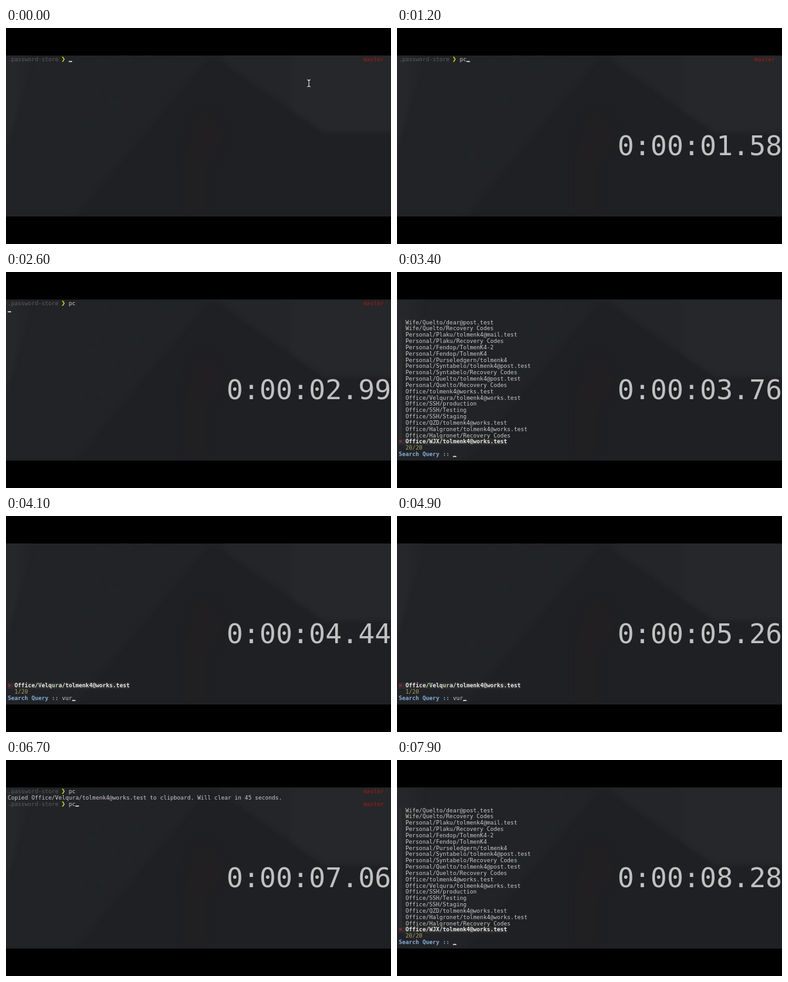
Write an HTML page that moves like this. It is 600 by 338 pixels and loops after 8000 ms.

```html
<!DOCTYPE html>
<html lang="en">
<head>
<meta charset="utf-8">
<title>Terminal search</title>
<style>
  html, body { margin: 0; width: 100%; height: 100%; overflow: hidden; background: #000; }
  svg { display: block; width: 100%; height: 100%; }
  text { font: 8.77px "DejaVu Sans Mono", monospace; white-space: pre; fill: #c9c9c9; }
  .path { fill: #5b5c5e; }
  .mark { fill: #d0dc20; font-size: 11px; font-weight: bold; }
  .branch { fill: #a51b14; }
  .bold { fill: #ececec; font-weight: bold; }
  .hit { fill: #b4d4b0; }
  .arrow { fill: #d3204c; font-weight: bold; }
  .count { fill: #a3a162; }
  .ask { fill: #86abd8; font-weight: bold; }
  .cursor { fill: #f0f0f0; }
  #timer { font-size: 42.6px; fill: #c1c1c1; }
</style>
</head>
<body>
<svg viewBox="0 0 600 338" preserveAspectRatio="none">
  <defs>
    <clipPath id="pane"><rect y="43" width="600" height="252"/></clipPath>
    <filter id="soft" x="-30%" y="-30%" width="160%" height="160%" color-interpolation-filters="sRGB"><feGaussianBlur stdDeviation="3"/></filter>
    <filter id="wide" x="-100%" y="-50%" width="300%" height="200%" color-interpolation-filters="sRGB"><feGaussianBlur stdDeviation="9"/></filter>
    <linearGradient id="edge">
      <stop offset="0" stop-color="#27292b"/>
      <stop offset="1" stop-color="#27292b" stop-opacity="0"/>
    </linearGradient>
  </defs>
  <rect width="600" height="338"/>
  <g clip-path="url(#pane)">
    <rect y="42" width="600" height="254" fill="#222326"/>
    <path d="M0 36H45L0 190Z" fill="url(#edge)" filter="url(#soft)"/>
    <path d="M325 30H610V166H495L345 60Z" fill="#242528" filter="url(#soft)"/>
    <path d="M443 30H610V165H495L443 130Z" fill="#26272a" filter="url(#soft)"/>
    <path d="M318 44L100 305H610V166H495L345 60Z" fill="#1f2023" filter="url(#soft)"/>
    <g id="weave" fill="#20282b" opacity=".5" filter="url(#soft)"></g>
    <path d="M282 300V200L295 140Q325 110 338 180L308 215V300Z" fill="#241f22" opacity=".45" filter="url(#wide)"/>
  </g>
  <g id="screen"></g>
  <g id="pointer" fill="none" stroke-linecap="round">
    <path id="beam" d="M469.8 81.2Q472 81.2 472 83V90Q472 91.8 469.8 91.8M474.2 81.2Q472 81.2 472 83M472 90Q472 91.8 474.2 91.8" stroke="#111" stroke-width="2.6"/>
    <path d="M469.8 81.2Q472 81.2 472 83V90Q472 91.8 469.8 91.8M474.2 81.2Q472 81.2 472 83M472 90Q472 91.8 474.2 91.8" stroke="#e8e8e8" stroke-width="1.2"/>
  </g>
  <text id="timer" x="343.8" y="199"></text>
</svg>
<script>
const LOOP = 8000, COL = 5.28, ROW = 9.84, LEFT = 2.7, BASE = 52;
const get = id => document.getElementById(id);
const screen = get('screen'), timer = get('timer'), pointer = get('pointer');

const user = 'tolmenk4', work = user + '@works.test', mail = user + '@post.test';
const codes = 'Recovery Codes';
const wanted = 'Office/Velqura/' + work;
const entries = [
  'Wife/Quelto/dear@post.test', 'Wife/Quelto/' + codes,
  'Personal/Plaku/' + user + '@mail.test', 'Personal/Plaku/' + codes,
  'Personal/Fendop/TolmenK4-2', 'Personal/Fendop/TolmenK4',
  'Personal/Purseledgern/' + user,
  'Personal/Syntabelo/' + mail, 'Personal/Syntabelo/' + codes,
  'Personal/Quelto/' + mail, 'Personal/Quelto/' + codes,
  'Office/' + work, wanted,
  'Office/SSH/production', 'Office/SSH/Testing', 'Office/SSH/Staging',
  'Office/QZD/' + work, 'Office/Halgronet/' + work, 'Office/Halgronet/' + codes,
  'Office/WJX/' + work
];

// Keystrokes and screen changes, in ms
const first = [['p', 800], ['c', 1000]];
const query = [['v', 3600], ['u', 3800], ['r', 4000]];
const second = [['p', 6400], ['c', 6600]];
const ENTER1 = 1700, LIST1 = 2800, PICK = 5000, COPIED = 6100, ENTER2 = 6800, LIST2 = 7700;
const ticks = [[0, .37], [1200, 1.58], [2600, 2.99], [4100, 4.44], [5700, 6.07], [6700, 7.06], [7900, 8.28]];

const typed = (keys, t) => keys.filter(k => t >= k[1]).map(k => k[0]).join('');
const px = col => (LEFT + col * COL).toFixed(2);
const py = row => (BASE + row * ROW).toFixed(2);
const put = (col, row, str, cls = '') => `<text x="${px(col)}" y="${py(row)}" class="${cls}">${str}</text>`;
const cursor = (col, row) =>
  `<rect class="cursor" x="${px(col)}" y="${(BASE + row * ROW - .3).toFixed(2)}" width="5.3" height="1.5"/>`;

function prompt(row, input) {
  return put(0, row, '.password-store', 'path') + put(15.8, row, '❯', 'mark') +
    put(18, row, input) + put(105, row, 'master', 'branch');
}

function matches(str, q) {
  return new RegExp([...q].join('.*'), 'i').test(str);
}

function highlight(str, q) {
  let i = 0;
  return [...str].map(c => {
    if (i < q.length && c.toLowerCase() === q[i]) {
      i++;
      return `<tspan class="hit">${c}</tspan>`;
    }
    return c;
  }).join('');
}

function finder(q) {
  const found = entries.filter(e => matches(e, q));
  if (q) found.sort((a, b) => (a === wanted) - (b === wanted));
  const top = 23 - found.length;
  let out = '';
  found.forEach((name, i) => {
    const row = top + i, best = row === 22;
    const width = best ? (name.length + 2) * COL : COL;
    out += `<rect x="${LEFT}" y="${(BASE + row * ROW - 7.8).toFixed(2)}" width="${width}" height="${ROW}" fill="${best ? '#2d2d2e' : '#2b2c2e'}"/>`;
    if (best) out += put(0, row, '&gt;', 'arrow');
    out += put(2, row, highlight(name, q), best ? 'bold' : '');
  });
  return out + put(2, 23, found.length + '/' + entries.length, 'count') +
    put(0, 24, 'Search Query ::', 'ask') + put(16, 24, q) + cursor(16 + q.length, 24);
}

function shell(t) {
  const a = typed(first, t);
  let out = prompt(0, a);
  if (t < ENTER1) return out + cursor(18 + a.length, 0);
  if (t < COPIED) return out + cursor(0, 1);
  const b = typed(second, t);
  out += put(0, 1, `Copied ${wanted} to clipboard. Will clear in 45 seconds.`) + prompt(2, b);
  return out + (t < ENTER2 ? cursor(18 + b.length, 2) : cursor(0, 3));
}

function clock(t) {
  let i = 1;
  while (i < ticks.length - 1 && t > ticks[i][0]) i++;
  const [t0, v0] = ticks[i - 1], [t1, v1] = ticks[i];
  const s = v0 + (v1 - v0) * (t - t0) / (t1 - t0);
  return '0:00:' + s.toFixed(2).padStart(5, '0');
}

function weave() {
  let out = '';
  for (let i = 0; i < 4; i++) {
    for (let j = 0; j < 8; j++) {
      const x = 150 + i * 36 - j * 6, y = 52 + j * 24 - i * 7;
      if (x + y * .85 < 335) out += `<ellipse cx="${x}" cy="${y}" rx="10" ry="5" transform="rotate(35 ${x} ${y})"/>`;
    }
  }
  get('weave').innerHTML = out;
}

let shown = '';
function draw(now) {
  const t = Math.floor(now % LOOP / 100) * 100;
  const view = t >= LIST2 ? finder('') :
    t >= LIST1 && t < PICK ? finder(typed(query, t)) : shell(t);
  if (view !== shown) screen.innerHTML = shown = view;
  timer.textContent = t < 100 ? '' : clock(t);
  pointer.style.display = t < 700 ? '' : 'none';
}

weave();
const start = performance.now();
function loop() {
  draw(performance.now() - start);
  requestAnimationFrame(loop);
}
loop();
</script>
</body>
</html>
```
